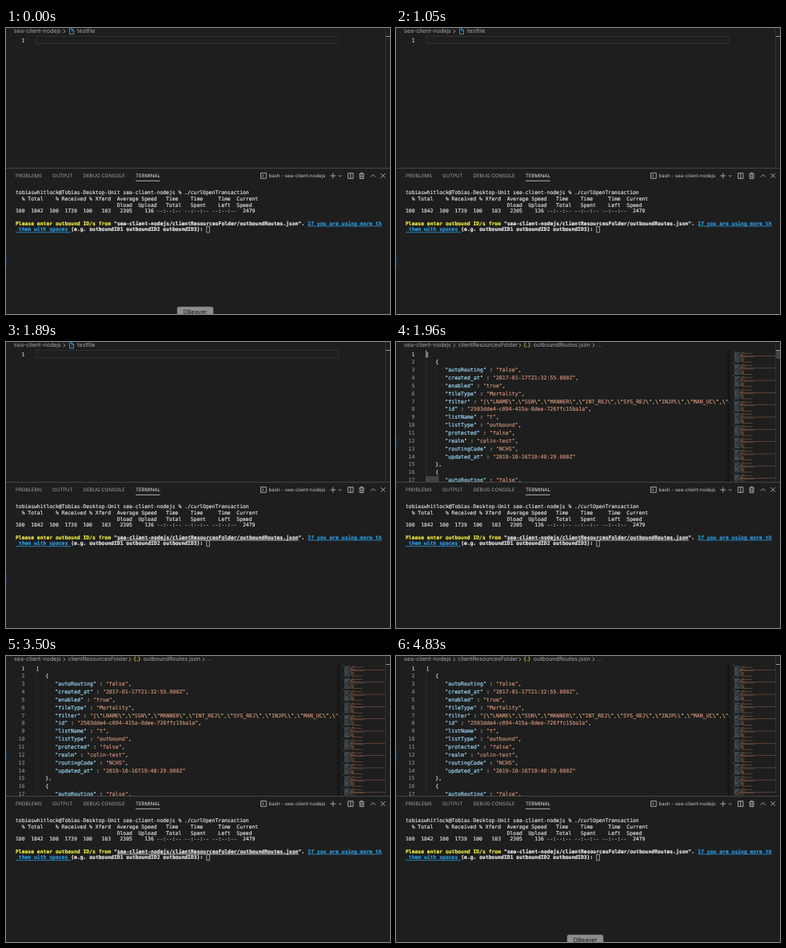
These frames come from a looping animation (480 by 358 pixels, 4970 ms). An HTML page:

```html
<!DOCTYPE html>
<html lang="en">
<head>
<meta charset="utf-8">
<title>Editor and terminal</title>
<style>
  html, body { margin: 0; width: 100%; height: 100%; overflow: hidden; background: #1e1e1e; }
  svg { display: block; width: 480px; height: 358px; }
  text { white-space: pre; text-rendering: geometricPrecision; }
  .ui { font-family: Inter, Roboto, sans-serif; }
  .crumb { font-size: 7.1px; fill: #a9a9a9; }
  .tab { font-size: 6.1px; fill: #a0a0a0; }
  .code, .term { fill: currentColor; stroke: currentColor; stroke-width: .16; }
  .code { font: 6.615px "DejaVu Sans Mono", monospace; color: #d4d4d4; }
  .term { font: 6.385px "DejaVu Sans Mono", monospace; color: #e2e2e2; }
  .num { text-anchor: end; color: #858585; }
  .icon { fill: none; stroke: #c5c5c5; stroke-width: .8; }
</style>
</head>
<body>
<svg viewBox="0 0 480 358">
  <defs>
    <clipPath id="pane"><rect width="480" height="175"/></clipPath>
    <clipPath id="column"><rect x="30" width="386.5" height="175"/></clipPath>
    <linearGradient id="shade">
      <stop stop-color="#000" stop-opacity="0"/>
      <stop offset="1" stop-color="#000" stop-opacity=".4"/>
    </linearGradient>
  </defs>
  <rect width="480" height="358" fill="#1e1e1e"/>

  <g clip-path="url(#pane)">
    <text class="ui crumb" x="10" y="6.4">sea-client-nodejs</text>
    <path class="icon" d="M71.7 2l2.2 2.2-2.2 2.2"/>
    <text class="code num" x="23.5" y="17.6" style="color:#c6c6c6">1</text>
    <g id="blank">
      <rect x="38" y="10.5" width="378" height="9" fill="none" stroke="#303030"/>
      <path d="M79.5 1h3l2 2v4.7h-5zM82.3 1v2.2h2.2" fill="none" stroke="#419fdc" stroke-width=".9"/>
      <text class="ui crumb" x="89" y="6.4">testfile</text>
    </g>
    <g id="json">
      <text class="ui crumb" x="77.5" y="6.4">clientResourcesFolder</text>
      <path class="icon" d="M153.8 2l2.2 2.2-2.2 2.2"/>
      <text class="ui" x="159.5" y="6.3" font-size="7" font-weight="600" fill="#d2b53c">{.}</text>
      <text class="ui crumb" x="171.8" y="6.4">outboundRoutes.json</text>
      <path class="icon" d="M245.8 2l2.2 2.2-2.2 2.2"/>
      <text class="ui crumb" x="251.5" y="6.4">...</text>
      <path d="M38.3 20V175M50.3 30V148M50.3 168V175" stroke="#353535" stroke-width=".6"/>
      <g id="numbers"></g>
      <g id="lines" clip-path="url(#column)"></g>
      <rect x="412" y="10" width="5" height="165" fill="url(#shade)"/>
      <g id="minimap" opacity=".55"></g>
      <g id="sliders" fill="#797979" fill-opacity=".4">
        <rect x="474.5" y="10" width="5.5" height="11"/>
        <rect x="37" y="168" width="16.500" height="7"/>
      </g>
      <rect id="caret" x="37.3" y="10.5" width="1" height="9.3" fill="#c4c4c4"/>
    </g>
    <path d="M474.5 0V175" stroke="#303030"/>
    <path d="M475 10.5h5" stroke="#9a9a9a"/>
  </g>
  <rect id="mark" width="1" height="12" fill="#16314c"/>

  <path d="M0 175.5H480" stroke="#444"/>
  <g class="ui">
    <text class="tab" x="12" y="187.4">PROBLEMS</text>
    <text class="tab" x="58" y="187.4">OUTPUT</text>
    <text class="tab" x="96.5" y="187.4">DEBUG CONSOLE</text>
    <text class="tab" x="162" y="187.4" style="fill:#e7e7e7">TERMINAL</text>
    <text class="tab" x="328.5" y="187.4" style="fill:#c8c8c8">bash - sea-client-nodejs</text>
  </g>
  <path d="M162 191.3h30.5" stroke="#d8d8d8" stroke-width=".8"/>
  <g class="icon">
    <path d="M318.5 181.5h6.8v6.8h-6.8zM320.3 183.2l1.8 1.7-1.8 1.7"/>
    <path d="M405.3 185h7M408.8 181.5v7"/>
    <path d="M416 184.3l1.8 1.7 1.8-1.7"/>
    <path d="M427.5 181.7h6.5v6.6h-6.5zM430.75 181.7v6.6"/>
    <path d="M441.3 182.8h6.6M443.3 182.6v-1.2h2.6v1.2M442.2 183v5.5h4.800V183M443.8 184.3v3M445.4 184.3v3"/>
    <path d="M455.8 186.5l3-3 3 3"/>
    <path d="M468.5 182l5.6 5.6M474.1 182l-5.6 5.6"/>
  </g>

  <g id="terminal"></g>
  <path id="links" stroke="#2b9be2" stroke-width=".8"/>
  <path id="hover" stroke="#e5e5e5" stroke-width=".8"/>
  <rect x="250.8" y="248.6" width="3.5" height="7.3" fill="none" stroke="#c8c8c8" stroke-width=".7"/>

  <g id="tip">
    <rect x="214" y="349" width="45" height="14" rx="2.2" fill="#8d8d8d" stroke="#6c6c6c" stroke-width=".5"/>
    <text class="ui" x="236.5" y="358" text-anchor="middle" font-size="7.4" fill="#161616">DBeaver</text>
  </g>
</svg>
<script>
const LOOP = 4970;
const $ = id => document.getElementById(id);

function add(parent, tag, attrs, text) {
  const el = document.createElementNS("http://www.w3.org/2000/svg", tag);
  for (const key in attrs) el.setAttribute(key, attrs[key]);
  if (text !== undefined) el.textContent = text;
  return parent.appendChild(el);
}

// JSON editor
const KEY = "#9cdcfe", STRING = "#ce9178", ESCAPE = "#d7ba7d", PLAIN = "#d4d4d4";
const fields = [
  ["autoRouting", "false"],
  ["created_at", "2017-01-17T21:32:55.000Z"],
  ["enabled", "true"],
  ["fileType", "Mortality"],
  ["filter", "[" + "LNAME SSN MANNER INT_REJ SYS_REJ INJPL MAN_UC AGE"
    .split(" ").map(s => `\\"${s}\\"`).join(",") + "]"],
  ["id", "2503dde4-c094-415a-8dee-726ffc15ba1a"],
  ["listName", "t"],
  ["listType", "outbound"],
  ["protected", "false"],
  ["realm", "colin-test"],
  ["routingCode", "NCHS"],
  ["updated_at", "2019-10-16T19:40:29.000Z"]
];

function codeLine(row, indent, parts) {
  const y = 17.6 + (row - 1) * 9.84;
  if (row > 1) add($("numbers"), "text", { class: "code num", x: 23.5, y }, row);
  const line = add($("lines"), "text", { class: "code", x: 37.5 + indent * 11.85, y });
  for (const [text, color] of parts) add(line, "tspan", { style: `color:${color}` }, text);
}

function fieldParts([key, value], last) {
  const parts = [[`"${key}"`, KEY], [" : ", PLAIN]];
  for (const piece of `"${value}"`.split(/(\\")/))
    parts.push([piece, piece === '\\"' ? ESCAPE : STRING]);
  if (!last) parts.push([",", PLAIN]);
  return parts;
}

codeLine(1, 0, [["[", PLAIN]]);
codeLine(2, 1, [["{", PLAIN]]);
fields.forEach((field, i) => codeLine(i + 3, 2, fieldParts(field, i === 11)));
codeLine(15, 1, [["},", PLAIN]]);
codeLine(16, 1, [["{", PLAIN]]);
codeLine(17, 2, fieldParts(fields[0]));

// Minimap: one thin row per line, repeating per record
const MINI = .547;
for (let row = 0; row < 150; row++) {
  const y = 10.5 + row * 2 * MINI, field = fields[(row + 13) % 14 - 1];
  const bar = (x, chars, fill) =>
    add($("minimap"), "rect", { x, y, width: Math.min(chars * MINI, 474 - x), height: .7, fill });
  if (!field) { bar(421.5, 2, "#888"); continue; }
  const [keyChars, valueChars] = field.map(s => s.length + 2);
  bar(423, keyChars, "#6d98ae");
  bar(423 + (keyChars + 3) * MINI, valueChars, "#b97b5d");
}

// Terminal
const col = n => 12 + n * 3.846;
const base = row => 208.4 + row * 7.65;

function print(row, column, text, color = "#e2e2e2", weight = "normal") {
  const style = `color:${color};font-weight:${weight}`;
  add($("terminal"), "text", { class: "term", x: col(column), y: base(row), style }, text);
}
const rule = (row, from, to) => `M${col(from)} ${base(row) + 1.4}H${col(to)}`;

[
  "tobiaswhitlock@Tobias-Desktop-Unit sea-client-nodejs % ./curlOpenTransaction",
  "  % Total    % Received % Xferd  Average Speed   Time    Time     Time  Current",
  "                                 Dload  Upload   Total   Spent    Left  Speed",
  "100  1842  100  1739  100   103   2305    136 --:--:-- --:--:-- --:--:--  2479"
].forEach((text, row) => print(row, 0, text));

const YELLOW = "#f3f33f", WHITE = "#f0f0f0", BLUE = "#2b9be2";
print(5, 0, "Please enter outbound ID/s from ", YELLOW, "bold");
print(5, 32, '"sea-client-nodejs/clientResourcesFolder/outboundRoutes.json".', WHITE, "bold");
print(5, 95, "If you are using more th", BLUE, "bold");
print(6, 0, " them with spaces ", BLUE, "bold");
print(6, 18, "(e.g. outboundID1 outboundID2 outboundID3):", WHITE, "bold");
$("links").setAttribute("d", rule(5, 95, 119) + rule(6, 0, 18));
$("hover").setAttribute("d", rule(5, 33, 92));

// Step tables: [start time, value]
const steps = {
  tip: [[0, 0], [70, 2], [140, 5], [210, 7.5], [280, 12], [4690, 7], [4760, 3], [4830, 0]],
  open: [[0, 0], [1960, 1]],
  caret: [[0, 0], [1960, 1], [2520, 0], [3010, 1], [3500, 0], [4060, 1], [4550, 0]],
  hover: [[0, 0], [1680, 1], [3640, 0]],
  sliders: [[0, 1], [2940, .5], [3010, 0]]
};
const at = (table, t) => table.reduce((value, [start, v]) => t >= start ? v : value, 0);
const show = (id, on) => { $(id).style.display = on ? "" : "none"; };

function draw(t) {
  const open = at(steps.open, t);
  show("json", open);
  show("blank", !open);
  show("caret", at(steps.caret, t));
  show("hover", at(steps.hover, t));
  $("sliders").setAttribute("opacity", at(steps.sliders, t));
  $("mark").setAttribute("y", open ? 119 : 288);
  $("tip").setAttribute("transform", `translate(0 ${at(steps.tip, t)})`);
}

const start = performance.now();
function tick() {
  draw((performance.now() - start) % LOOP);
  requestAnimationFrame(tick);
}
tick();
</script>
</body>
</html>
```
